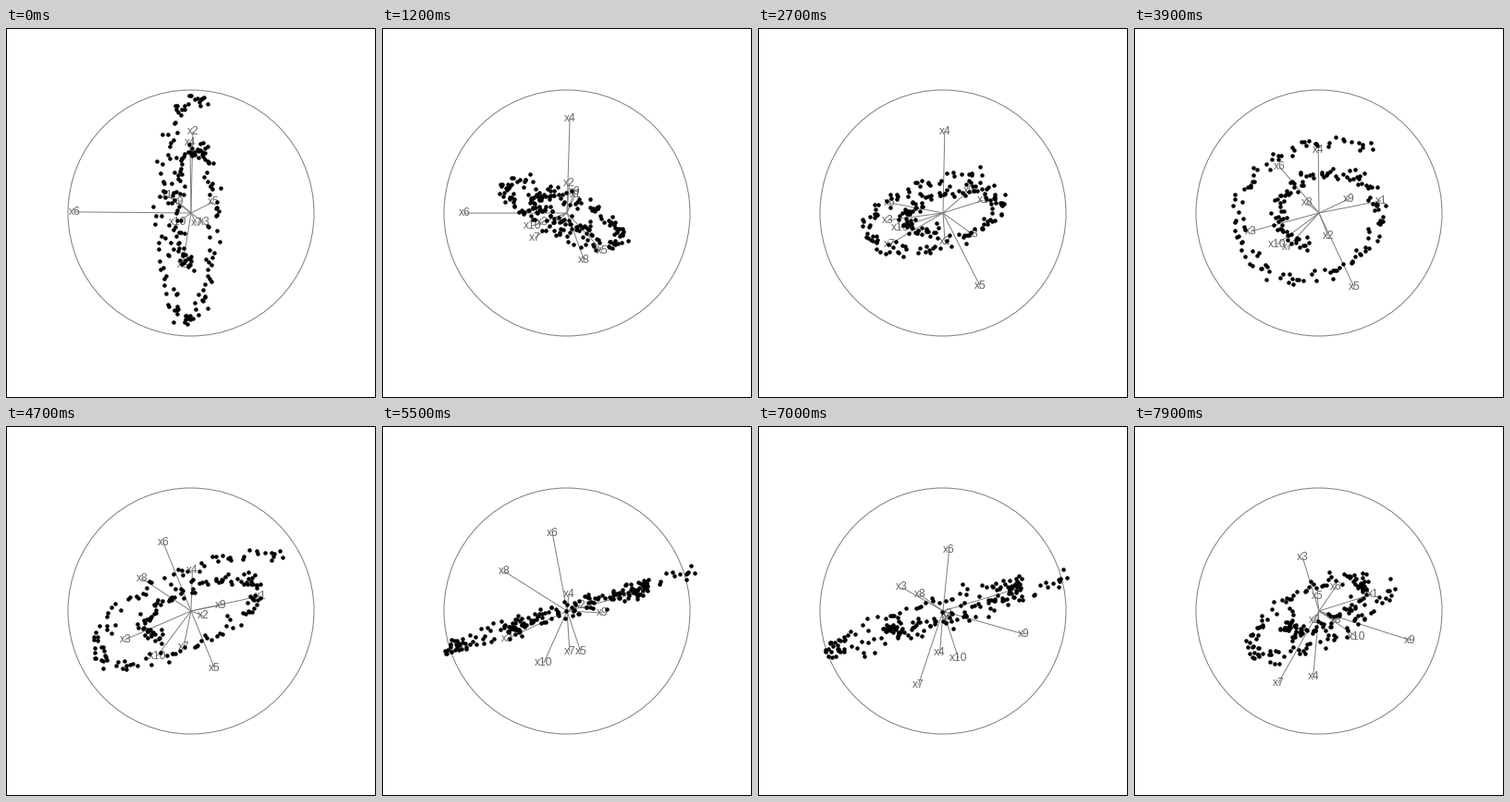
Recreate the animation shown at these times as a matplotlib script. Size 400x400 px, loop 8000 ms.

```python
import numpy as np
import matplotlib.pyplot as plt
from matplotlib.animation import FuncAnimation
from matplotlib.collections import LineCollection

SIZE, RADIUS, STEPS, COUNT = 400, 133, 80, 200
MID = SIZE / 2
PX = 0.72  # points per pixel at 100 dpi
GREY, INK = "#7f7f7f", "#666666"

# Tour stops: step -> where the tips of x1 to x10 point.
TIPS = {
    0: [-26+19j, 2+88j, 14-10j, -1+76j, 24+12j,
        -126+1j, 6-11j, -9-56j, -14+12j, -14-10j],
    27: [44+14j, 2-31j, -60-8j, 2+88j, 40-79j,
         -58+11j, -58-34j, 32-23j, 28+24j, -47-16j],
    55: [78+20j, 14+6j, -65-30j, 2+18j, 15-44j,
         -16+84j, 3-44j, -68+43j, 38-2j, -25-56j],
    79: [58+18j, -5-10j, -18+58j, -6-71j, -2+16j,
         18+26j, -44-78j, 18-10j, 99-32j, 41-28j],
}

# Step -> the two half-axes of the spiral as seen on screen.
PLANE = {
    0: [3+125j, -35],
    12: [-55+36j, -40-6j],
    27: [15+42j, -84-12j],
    39: [30+78j, -88+15j],
    55: [118+40j, -70-17j],
    70: [115+30j, -65-35j],
    79: [68+14j, -40-50j],
}


def glide(stops, t):
    """Smooth Hermite path through the stops."""
    steps, keys = list(stops), np.array(list(stops.values()))
    slope = np.gradient(keys, steps, axis=0)
    k = min(np.searchsorted(steps, t, side="right") - 1, len(steps) - 2)
    h = steps[k + 1] - steps[k]
    u = (t - steps[k]) / h
    return ((1 + 2 * u) * (1 - u) ** 2 * keys[k]
            + u * (1 - u) ** 2 * h * slope[k]
            + u * u * (3 - 2 * u) * keys[k + 1]
            + u * u * (u - 1) * h * slope[k + 1])


def project(tips):
    """Nearest orthonormal projection, scaled to the circle."""
    u, _, vt = np.linalg.svd(np.column_stack([tips.real, tips.imag]),
                             full_matrices=False)
    return MID + RADIUS * (u @ vt)


# Noisy spiral of one and a half turns.
rng = np.random.default_rng(11)
turn = np.linspace(-0.1, 3, COUNT) * np.pi
reach = np.interp(turn / np.pi, [0, 1, 2, 3], [1, 0.92, 0.54, 0.43])
spiral = np.column_stack([reach * np.cos(turn), reach * np.sin(turn)])
noise = np.clip(rng.normal(0, 4.5, (COUNT, 2)), -8, 8) @ [1, 1j]

fig = plt.figure(figsize=(4, 4), dpi=100, facecolor="white")
ax = fig.add_axes([0, 0, 1, 1])
ax.set(xlim=(0, SIZE), ylim=(0, SIZE))
ax.axis("off")
ax.add_patch(plt.Rectangle((0.5, 0.5), SIZE - 1, SIZE - 1, fill=False,
                           ec="black", lw=PX, snap=False))
ax.add_patch(plt.Circle((MID, MID), RADIUS, fill=False, ec=GREY, lw=PX))
spokes = ax.add_collection(LineCollection([], colors=GREY, linewidths=PX,
                                          zorder=2))
labels = [ax.text(MID, MID, f"x{i}", family="Liberation Sans",
                  size=12 * PX, color=INK, ha="center", va="center", zorder=3)
          for i in range(1, 11)]
dots, = ax.plot([], [], "o", color="black", ms=4.5 * PX, mew=0, zorder=4)


def draw(step):
    tips = project(glide(TIPS, step))
    spokes.set_segments([[(MID, MID), tip] for tip in tips])
    for label, tip in zip(labels, tips):
        label.set_position(tip)

    cloud = spiral @ glide(PLANE, step) + noise
    dots.set_data(MID + cloud.real, MID + cloud.imag)
    return [spokes, dots, *labels]


anim = FuncAnimation(fig, draw, frames=STEPS, interval=100, repeat=True,
                     repeat_delay=0)
plt.show()
```
